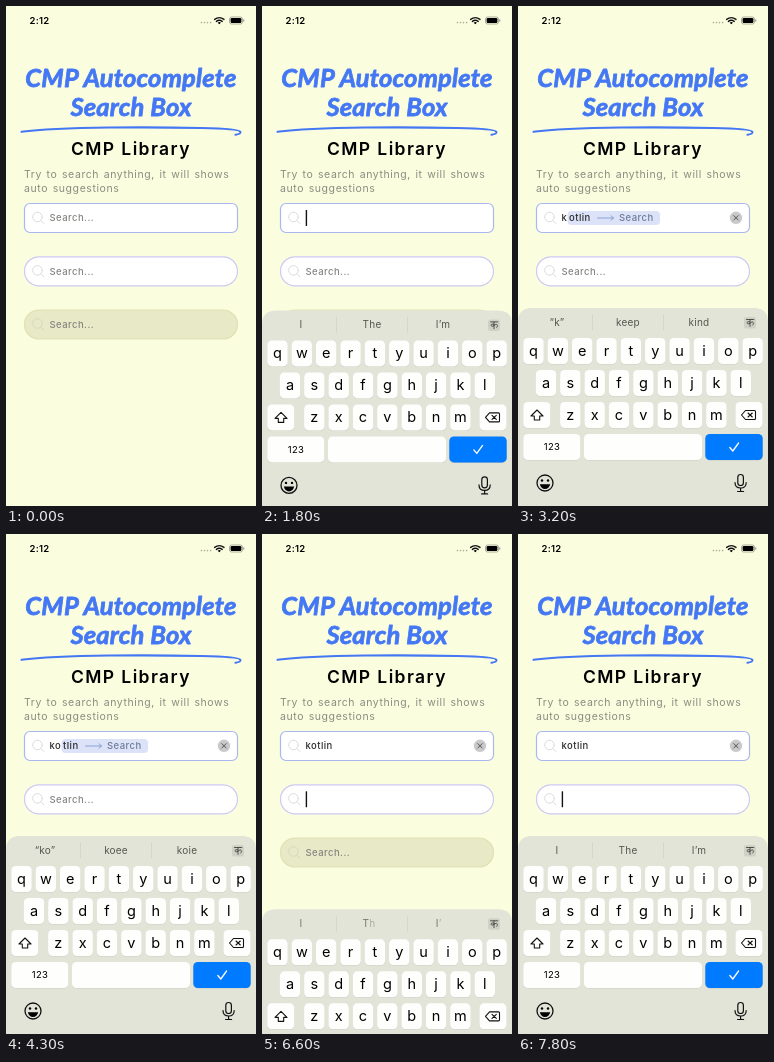
These frames come from a looping animation (250x500 px, 8000 ms). An HTML page:

```html
<!DOCTYPE html>
<html lang="en">
<head>
<meta charset="utf-8">
<title>Autocomplete search box</title>
<style>
  html, body { margin: 0; width: 100%; height: 100%; overflow: hidden; background: #fbfddf; }
  svg { display: block; width: 250px; height: 500px; font-family: Inter, sans-serif; }
  .title { font: italic 700 25.5px Lato, sans-serif; letter-spacing: .2px; text-anchor: middle;
           fill: #4477f4; stroke: #4477f4; stroke-width: .8; stroke-linejoin: round; }
  .heading { font-size: 17.5px; font-weight: 600; letter-spacing: 1.4px; }
  .body { font-size: 10.5px; letter-spacing: .58px; word-spacing: 1.1px; fill: #8b8c80; }
  .field { font-size: 9.5px; font-weight: 500; letter-spacing: .45px; fill: #2c2c2c; }
  .field .muted { fill: #858582; }
  .key { font-size: 14.5px; text-anchor: middle; }
  .small { font-size: 9.5px; text-anchor: middle; letter-spacing: .3px; }
  .suggestion { font-size: 10px; text-anchor: middle; letter-spacing: .2px; fill: #55564f; }
  .line { fill: none; stroke: #111; stroke-linecap: round; stroke-linejoin: round; }
</style>
</head>
<body>
<svg id="stage" viewBox="0 0 250 500"></svg>
<script>
const LOOP = 8000;
const FIRST_FOCUS = 1450, TYPE_K = 2760, TYPE_O = 3660, SUBMIT = 4880, SECOND_FOCUS = 6484;
const KEYBOARD_HEIGHT = 198;
const clamp = v => Math.max(0, Math.min(1, v));

const text = (x, y, str, cls = '', extra = '') =>
  `<text x="${x}" y="${y}" class="${cls}" ${extra}>${str}</text>`;
const rect = (x, y, w, h, r, fill, extra = '') =>
  `<rect x="${x}" y="${y}" width="${w}" height="${h}" rx="${r}" fill="${fill}" ${extra}/>`;
const line = (d, width = 1, extra = '') =>
  `<path class="line" d="${d}" stroke-width="${width}" ${extra}/>`;

function statusBar() {
  const dots = [195.5, 198.5, 201.5, 204.5]
    .map(x => `<circle cx="${x}" cy="16.6" r=".8" fill="#a9aa98"/>`).join('');
  return text(23.5, 18, '2:12', '', 'font-size="9.5" font-weight="600" letter-spacing=".3"') + dots +
    line('M208.6 13.4Q213.3 9.8 218 13.4M210.4 15.4Q213.3 13.2 216.2 15.4', 1.4) +
    '<path d="M211.7 16.7Q213.3 15.5 214.9 16.7L213.3 18.3Z"/>' +
    rect(223.5, 11, 13, 7, 2, 'none', 'stroke="#8d8e80" stroke-width=".7"') +
    rect(224.6, 12, 10.8, 5, 1.2, '#000') + rect(237.3, 13.3, 1, 2.4, .5, '#8d8e80');
}

function field(y, radius, fill, border, id) {
  const icon = fill === '#fff' ? '#dcdcde' : '#d8d9ba';
  return `<g transform="translate(0 ${y})" class="field">` +
    rect(18.5, .5, 213, 29, radius, fill, `stroke="${border}" stroke-width="1.2"`) +
    `<g fill="none" stroke="${icon}" stroke-linecap="round"><circle cx="31.5" cy="14" r="4.8"/><path d="M35 17.6L38 20.6"/></g>` +
    `<g id="${id}"></g></g>`;
}

function keyboard() {
  const rows = [['qwertyuiop', 15.5, 332], ['asdfghjkl', 28, 364], ['zxcvbnm', 52.3, 396]];
  const letters = rows.map(([chars, x0, y]) => [...chars].map((char, i) => {
    const x = x0 + i * 24.35;
    return keyCap(x - 10.2, y, 20.4) + text(x, y + 17.6, char, 'key');
  }).join('')).join('');
  return '<path d="M0 500V316Q0 302 14 302H236Q250 302 250 316V720H0Z" fill="#e2e4d8"/>' +
    line('M74.5 309V324M145.5 309V324', .7, 'style="stroke:#cfd1c5"') +
    '<g id="suggestions"></g>' +
    rect(226, 311, 12, 11.5, 2.5, '#cfd1c6') +
    line('M228.5 313.5H235.8M232 313.5V320.3M232 316C228 314 228 319.5 232 317.2C235 314.5 236.5 317 234.8 319', .9, 'style="stroke:#44453f"') +
    letters +
    keyCap(5.3, 396, 27) + line('M19 404L13 410H16.3V414H21.7V410H25Z', 1.1) +
    keyCap(217.5, 396, 27) +
    line('M223.5 409L227.5 404.5H236.5Q237.5 404.5 237.5 405.5V412.5Q237.5 413.5 236.5 413.5H227.5ZM230 407L234.3 411M234.3 407L230 411', 1.1) +
    keyCap(5.3, 428, 57) + text(34, 444.2, '123', 'small') +
    keyCap(66, 428, 118) +
    keyCap(187.3, 428, 57.4, '#007aff') +
    line('M211.8 441.5L214.8 445L220.6 437', 1.3, 'style="stroke:#fff"') +
    '<circle class="line" cx="27" cy="477" r="8" stroke-width="1.3"/>' +
    '<circle cx="24" cy="474.5" r="1.2"/><circle cx="30" cy="474.5" r="1.2"/>' +
    '<path d="M21.8 478.2H32.2Q31 483 27 483T21.8 478.2Z"/>' +
    rect(219.8, 468.5, 5.6, 11, 2.8, 'none', 'stroke="#111" stroke-width="1.2"') +
    line('M217 476.5Q217 482 222.6 482T228.2 476.5M222.6 482V485.5M219.6 485.5H225.6', 1.2);
}

function keyCap(x, y, w, fill = '#fefefd') {
  return rect(x, y + .6, w, 26, 4.5, '#cbcdc1') + rect(x, y, w, 26, 4.5, fill);
}

const stage = document.getElementById('stage');
stage.innerHTML = statusBar() +
  text(125, 81, 'CMP Autocomplete', 'title') + text(125, 110, 'Search Box', 'title') +
  line('M15.5 125.8C55 120.5 150 121 195 122C222 122.5 234 124 234.5 126C234.7 127.6 232 128.4 229.5 128.8', 2.1, 'style="stroke:#4477f4"') +
  text(65, 149, 'CMP Library', 'heading') +
  text(18, 171.5, 'Try to search anything, it will shows', 'body') +
  text(18, 186, 'auto suggestions', 'body') +
  field(197, 5.5, '#fff', '#a9b8ef', 'first') +
  field(250.3, 14.5, '#fff', '#cdc9f3', 'second') +
  field(303.5, 14.5, '#e8e9c6', '#dfe1b4', 'third') +
  `<g id="keyboard">${keyboard()}</g>`;

const part = id => document.getElementById(id);
const placeholder = text(43.5, 18.3, 'Search...', 'muted');
const clearButton = '<circle cx="218" cy="14.8" r="6.2" fill="#c9c9ca"/>' +
  line('M215.8 12.6L220.2 17M220.2 12.6L215.8 17', 1, 'style="stroke:#555"');
part('third').innerHTML = placeholder;

const blinkingCursor = age => age % 1100 < 600 ? rect(43.7, 7, 1.4, 16, .5, '#111') : '';

function completion(typed, rest, x, opacity) {
  return text(43.5, 18.3, typed) +
    `<g opacity="${opacity}">` + rect(x - 1.5, 8, 143.5 - x, 14, 4, '#dce3f9') +
    text(x, 18.3, rest) +
    line('M79.5 15H95.5M93 12.8L95.5 15L93 17.2', .9, 'style="stroke:#7f9bd2"') +
    text(101, 18.3, 'Search', '', 'style="fill:#6d7c98"') + '</g>' + clearButton;
}

function firstField(t) {
  if (t < FIRST_FOCUS) return placeholder;
  if (t < TYPE_K) return blinkingCursor(t - FIRST_FOCUS);
  if (t < TYPE_O) return completion('k', 'otlin', 51, clamp((t - TYPE_K) / 200));
  if (t < SUBMIT) return completion('ko', 'tlin', 57, 1);
  return text(43.5, 18.3, 'kotlin') + clearButton;
}

// Critically damped spring, running from 1 to 0.
function spring(age) {
  const p = Math.max(0, age) * .01826;
  return (1 + p) * Math.exp(-p);
}

function keyboardOffset(t) {
  const hidden = t < SUBMIT ? spring(t - FIRST_FOCUS)
    : t < SECOND_FOCUS ? 1 - spring(t - SUBMIT)
    : spring(t - SECOND_FOCUS);
  return hidden * KEYBOARD_HEIGHT;
}

function suggestions(t) {
  const [start, words] = [
    [SECOND_FOCUS, ['I', 'The', 'I’m']],
    [TYPE_O, ['“ko”', 'koee', 'koie']],
    [TYPE_K, ['“k”', 'keep', 'kind']],
    [0, ['I', 'The', 'I’m']]
  ].find(([from]) => t >= from);
  const age = t - (start || FIRST_FOCUS);
  return words.map((word, i) => text(39 + i * 71, 320, [...word].map((char, j) =>
    `<tspan fill-opacity="${clamp((age - 40 - 40 * j) / 100)}">${char}</tspan>`).join(''), 'suggestion')).join('');
}

function draw() {
  const t = performance.now() % LOOP;
  part('first').innerHTML = firstField(t);
  part('second').innerHTML = t < SECOND_FOCUS ? placeholder : blinkingCursor(t - SECOND_FOCUS);
  part('suggestions').innerHTML = suggestions(t);
  part('keyboard').setAttribute('transform', `translate(0 ${keyboardOffset(t)})`);
  requestAnimationFrame(draw);
}
draw();
</script>
</body>
</html>
```
